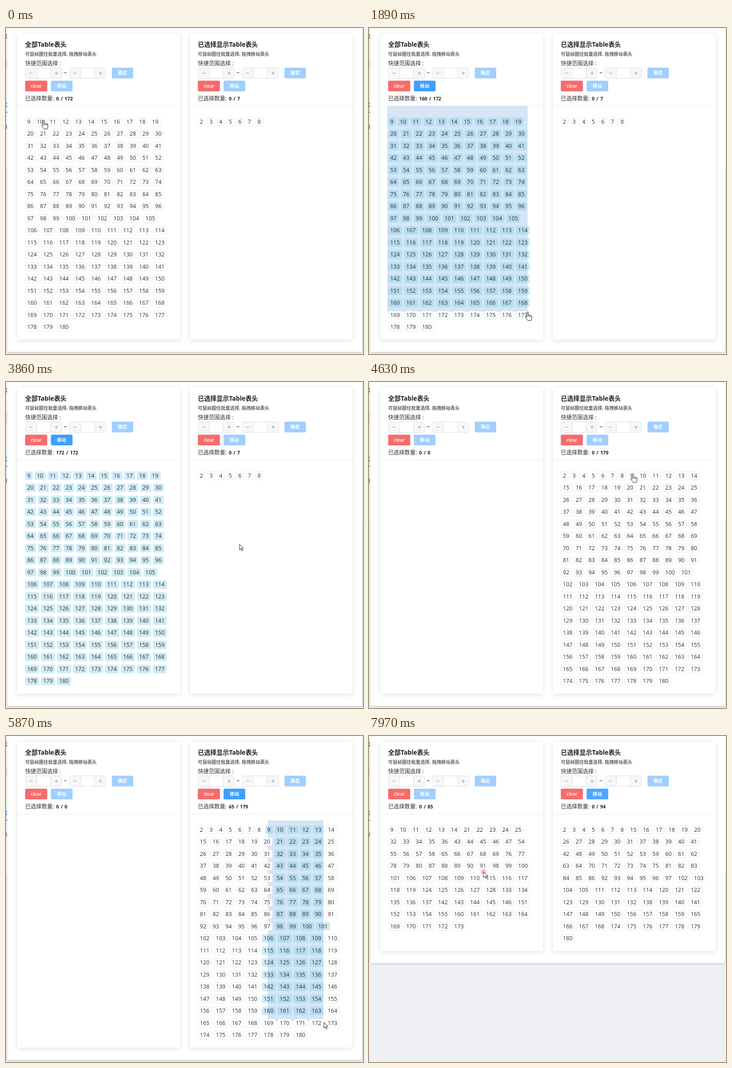
These frames come from a looping animation (783x715 px, 8000 ms). An HTML page with a canvas:

```html
<!DOCTYPE html>
<html lang="zh">
<head>
<meta charset="utf-8">
<style>
  html, body { margin: 0; height: 100%; overflow: hidden; }
  canvas { display: block; }
</style>
</head>
<body>
<canvas width="783" height="715"></canvas>
<script>
const ctx = document.querySelector('canvas').getContext('2d');
const LOOP = 8000, LAG = 6, ROW = 26.5, FIRST_ROW = 205.3, RIGHT = 378.7;
const BLUE = '#409eff';

// Pointer path: time, x, y
const PATH = [
  [0, 83, 203], [650, 40, 171], [870, 40, 171], [1200, 283, 402], [1630, 343, 590],
  [1890, 348, 623], [2150, 349, 658], [2330, 349, 658], [2480, 363, 660],
  [2790, 326, 398], [3150, 307, 365], [3430, 307, 365], [4090, 621, 351],
  [4240, 621, 351], [4630, 579, 202], [4950, 574, 185], [5140, 574, 185],
  [5870, 697, 628], [6100, 732, 646], [6250, 732, 646], [6720, 590, 210],
  [6810, 597, 214], [7160, 597, 214], [7930, 251, 298], [LOOP, 251, 298]
];
// Each lasso is pressed, released, then its chips are dragged and dropped
const LASSOS = [
  { press: 870, release: 2330, drop: 4100 },
  { press: 5140, release: 6250, drop: 7955 }
];

const HAND = new Path2D('M-1.5 11V1a1.5 1.5 0 0 1 3 0V7q1.5-1.2 3 .3 1.5-1 2.5.6 2-.6 2 1.4V13l-1.5 5.5h-7l-5-7q-.5-2.5 2-1.5z');
const ARROW = new Path2D('M0 0V12.5l3-2.8 2.3 5 1.9-.9-2.2-4.8H9z');

const range = (a, b) => Array.from({ length: b - a + 1 }, (_, i) => a + i);

function pointer(t) {
  const i = Math.max(1, PATH.findIndex(k => k[0] >= t));
  const [t0, x0, y0] = PATH[i - 1], [t1, x1, y1] = PATH[i];
  const p = Math.max(0, (t - t0) / (t1 - t0));
  return { x: x0 + (x1 - x0) * p, y: y0 + (y1 - y0) * p };
}

function lassoBox(lasso, t) {
  const a = pointer(lasso.press);
  const b = pointer(Math.max(lasso.press, Math.min(t - LAG, lasso.release)));
  return { x: a.x, y: a.y, w: b.x - a.x, h: b.y - a.y };
}

// Wraps numbered chips into rows
function layout(nums, left) {
  let x = 0, row = 0;
  return nums.map(n => {
    const w = 9.1 + 6.98 * String(n).length;
    if (x + w > 320) { x = 0; row++; }
    const chip = { n, row, x: left + x, w, y: FIRST_ROW + row * ROW };
    x += w + 5;
    return chip;
  });
}

const inBox = (c, b) => {
  const x = c.x + c.w / 2;
  return x >= b.x && x <= b.x + b.w && c.y >= b.y && c.y <= b.y + b.h;
};

const ALL = range(2, 180);
const lastPick = new Set(layout(ALL, 42 + RIGHT)
  .filter(c => inBox(c, lassoBox(LASSOS[1], LASSOS[1].drop))).map(c => c.n));

function lists(t) {
  if (t < LASSOS[0].drop) return [range(9, 180), range(2, 8)];
  if (t < LASSOS[1].drop) return [[], ALL];
  return [ALL.filter(n => lastPick.has(n)), ALL.filter(n => !lastPick.has(n))];
}

function fill(x, y, w, h, color, r = 0, border) {
  ctx.beginPath();
  ctx.roundRect(x, y, w, h, r);
  ctx.fillStyle = color;
  ctx.fill();
  if (border) {
    ctx.strokeStyle = border;
    ctx.lineWidth = 1;
    ctx.stroke();
  }
}

function text(str, x, y, size, color = '#303133', weight = 400, align = 'left') {
  ctx.font = `${weight} ${size}px "Open Sans", "Noto Sans CJK SC", "Noto Sans CJK", sans-serif`;
  ctx.fillStyle = color;
  ctx.textAlign = align;
  ctx.fillText(str, x, y + size * .36);
}

function shadowed(blur, dy, alpha, draw) {
  ctx.save();
  ctx.shadowBlur = blur;
  ctx.shadowOffsetY = dy;
  ctx.shadowColor = `rgba(0,0,0,${alpha})`;
  draw();
  ctx.restore();
}

function button(label, x, y, w, color) {
  fill(x, y, w, 23.5, color, 2.5);
  text(label, x + w / 2, y + 11.5, 10.2, '#fff', 600, 'center');
}

function stepper(x) {
  fill(x + .5, 87.5, 80, 23, '#fff', 3, '#dcdfe6');
  fill(x + 1, 88, 24, 22, '#f5f7fa', 2);
  fill(x + 56, 88, 24, 22, '#f5f7fa', 2);
  fill(x + 25, 88, 1, 22, '#dcdfe6');
  fill(x + 55, 88, 1, 22, '#dcdfe6');
  fill(x + 9, 98.5, 7, 1, '#8b8e95');
  fill(x + 65, 98.5, 7, 1, '#8b8e95');
  fill(x + 68, 95.5, 1, 7, '#8b8e95');
}

function panel(dx, title, count, bottom, moveColor) {
  const x = 42 + dx;
  shadowed(11, 2, .12, () => fill(25 + dx, 12, 356.5, bottom - 12, '#fff', 3));
  text(title, x, 36, 13.7, '#1f2023', 700);
  text('可鼠标圈住批量选择, 拖拽移动表头', x, 57.5, 10.1, '#606266', 600);
  text('快捷范围选择 :', x, 77.5, 12);
  stepper(x);
  text('~', x + 88, 99, 12, '#303133', 600, 'center');
  stepper(x + 96.5);
  button('确定', x + 190, 87, 47, '#a0cfff');
  button('clear', x, 115.5, 48.5, '#f56c6c');
  button('移动', x + 56.5, 115.5, 47.5, moveColor);
  text('已选择数量:', x, 155, 12);
  ctx.wordSpacing = '1.5px';
  text(count, x + 68, 155.5, 10.4, '#1f2023', 700);
  ctx.wordSpacing = '0px';
  fill(25 + dx, 170.5, 356.5, 1, '#ebeef5');
}

function drawChip(c, picked) {
  if (picked) fill(c.x, c.y - 9, c.w + .5, 18.5, 'rgba(135,206,235,.4)', 3);
  else fill(c.x + .5, c.y - 8.5, c.w - .5, 17.5, '#fff', 3, '#e6e8ea');
  text(c.n, c.x + c.w / 2, c.y, 12.3, '#333', 400, 'center');
}

function page(bottom) {
  fill(0, 0, 783, 715, '#eef0f3');
  fill(0, 0, 783, 305, '#fafbfb');
  fill(0, 67, 3, 24, '#ebeced');
  fill(0, 14, 2, 2, '#444');
  fill(0, 19, 2, 4, '#777');
  fill(0, 164, 2, 3, BLUE);
  fill(0, 170, 2, 4, BLUE);
  fill(0, 184, 3, 2, BLUE);
  fill(0, 212, 2, 9, '#999');
  shadowed(4, 1, .22, () => fill(3, .5, 778, bottom - .5, '#fff', 2));
}

// Fades from active to disabled
const fading = p => `rgb(${64 + 96 * p},${158 + 49 * p},255)`;

function drawPointer(tip, shape) {
  ctx.save();
  ctx.translate(tip.x, tip.y);
  ctx.fillStyle = '#fff';
  ctx.strokeStyle = '#222';
  ctx.lineWidth = 1;
  ctx.fill(shape);
  ctx.stroke(shape);
  if (shape === HAND) ctx.stroke(new Path2D('M1.5 7v3M4.5 7.5v3M7 8.2v2.5'));
  ctx.restore();
}

function draw(t) {
  const sides = lists(t).map((nums, i) => layout(nums, 42 + i * RIGHT));
  const chips = sides.flat();
  const rows = Math.max(...chips.map(c => c.row));
  const bottom = FIRST_ROW + rows * ROW + 27.6;

  const active = LASSOS.findIndex(l => t >= l.press && t < l.drop);
  const box = active >= 0 && lassoBox(LASSOS[active], t);
  const picked = new Set(box ? sides[active].filter(c => inBox(c, box)) : []);

  page(bottom + 27);
  sides.forEach((list, i) => {
    const n = active === i ? picked.size : 0;
    const since = t - LASSOS[i].drop;
    const fade = n ? 0 : since >= 0 ? Math.min(1, since / 100) : 1;
    panel(i * RIGHT, i ? '已选择显示Table表头' : '全部Table表头', `${n} / ${list.length}`, bottom, fading(fade));
  });

  // The lasso lies behind the chips
  if (box && t < LASSOS[active].release)
    fill(box.x, box.y, box.w, box.h, 'rgba(45,130,205,.2)');
  for (const c of chips) drawChip(c, picked.has(c));

  const tip = pointer(t), seen = pointer(t - LAG);
  if (LASSOS.some(l => t >= l.drop && t < l.drop + 100))
    fill(tip.x - 4.5, tip.y - 4.5, 9, 9, 'rgba(245,108,120,.4)', 4.5, 'rgba(235,80,95,.7)');

  const overChip = chips.some(c => seen.x >= c.x && seen.x <= c.x + c.w && Math.abs(seen.y - c.y) <= 9);
  drawPointer(tip, overChip ? HAND : ARROW);
}

const start = performance.now();
function frame() {
  draw((performance.now() - start) % LOOP);
  requestAnimationFrame(frame);
}
frame();
</script>
</body>
</html>
```
